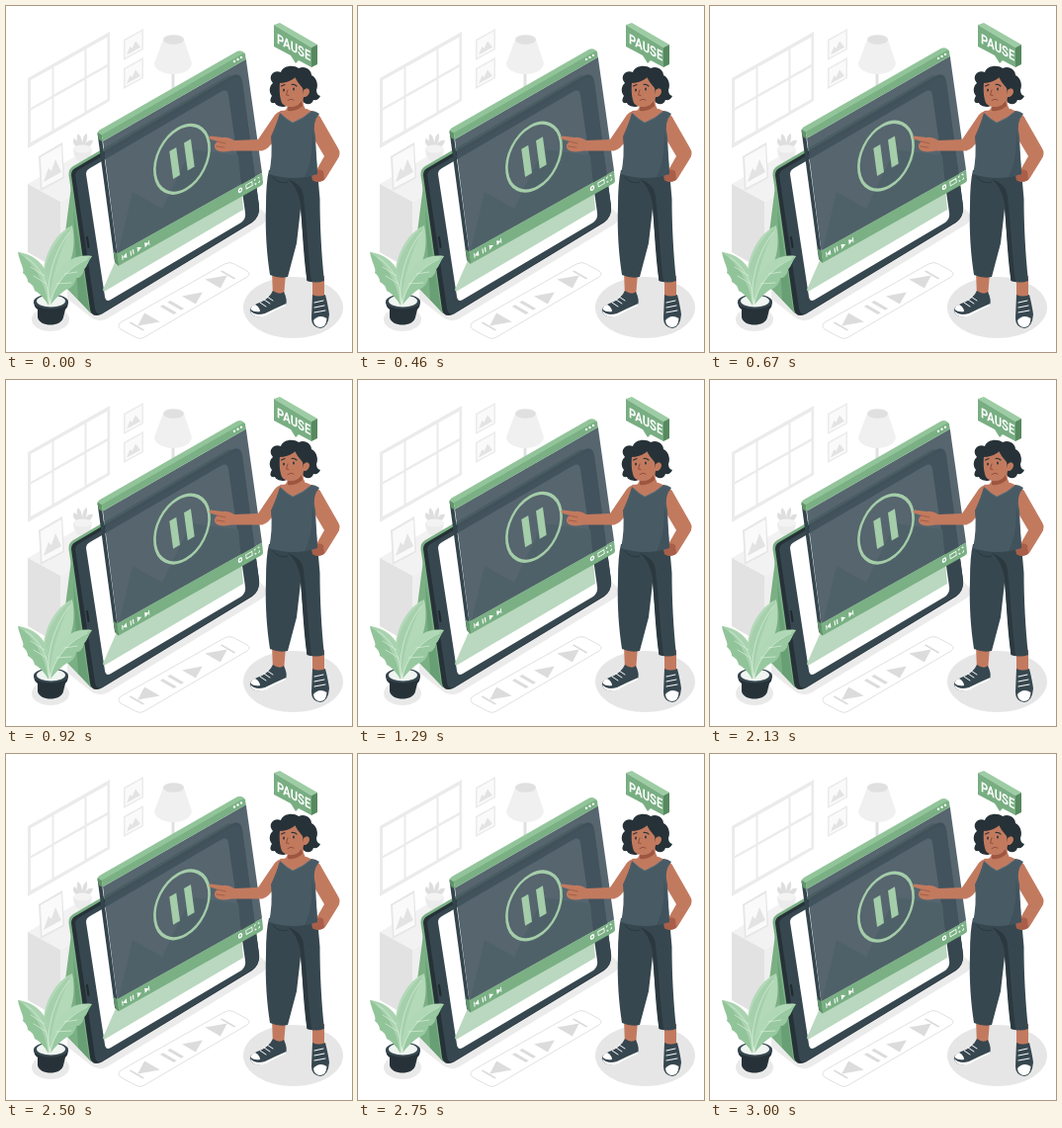
Animation, 350 px wide and 350 px high, one loop 3040 ms. Source, as an HTML page:

```html
<!DOCTYPE html>
<html lang="en">
<head>
<meta charset="utf-8">
<title>Pause</title>
<style>
  html, body { margin: 0; width: 100%; height: 100%; overflow: hidden; background: #fff; }
  svg { display: block; width: 100vw; height: 100vh; }
  .skin { fill: #c27a5f; }
  .dark { fill: #263238; }
  .slate { fill: #37474f; }
  .line { fill: none; stroke-linecap: round; stroke-linejoin: round; }
  .sign { font: 700 14px Roboto, "Liberation Sans", sans-serif; fill: #fff; }
</style>
</head>
<body>
<svg viewBox="0 0 350 350">
  <defs>
    <g id="picture">
      <path d="M0 11 20 0V21L0 32Z" fill="#ebebeb"/>
      <path d="M1.5 12 18.5 2.6V20.2L1.5 29.6Z" fill="#fafafa"/>
      <path d="M3 26.5 6.5 18 8.5 20 12 12.5 17 18.8Z" fill="#e3e3e3"/>
    </g>
    <path id="triangle" d="M-3 -3.2 3 0 -3 3.2Z"/>
  </defs>

  <!-- room -->
  <g id="room">
    <path fill="#ebebeb" fill-rule="evenodd" d="M22 73 105 26V96L22 144Z
      M25 75V103L46.500 91V63Z M48.500 61.800V89.600L79.500 72V44.500Z M81.500 43.300V70.800L102.500 59V31.500Z
      M25 105.500V138L46.500 126V93.500Z M48.500 92.300V124.800L79.500 107.400V74.800Z M81.500 73.600V106L102.500 94.200V61.700Z"/>
    <use href="#picture" x="119" y="23"/>
    <use href="#picture" x="119" y="52"/>

    <path d="M167.500 66H170.500V90H167.500Z" fill="#e0e0e0"/>
    <path d="M159 34 150 58C151 72 186 73 188 58L180 34Z" fill="#f0f0f0"/>
    <ellipse cx="169.500" cy="34" rx="10.500" ry="4.800" fill="#e0e0e0"/>

    <path d="M22 180 79 147 112 166 55 198Z" fill="#f2f2f2"/>
    <path d="M22 180 55 198V268L22 249Z" fill="#e2e2e2"/>
    <path d="M55 198 112 166V235L55 268Z" fill="#efefef"/>
    <path d="M33 152 57 138 59 174 35 187Z" fill="#e6e6e6"/>
    <path d="M35 153 56 141 57.500 173 36.500 184Z" fill="#fafafa"/>
    <path d="M38 178 43 164 46 167 50 155 56 168Z" fill="#e3e3e3"/>
    <path d="M77 146Q65 140 69 134Q74 137 76 144Q69 133 73 129Q78 134 77 143Q77 130 82 129Q83 136 78 144Q82 134 88 136Q87 143 77 146Z" fill="#dedede"/>
    <path d="M68 144C68 162 86 162 87 144Z" fill="#ebebeb"/>
    <ellipse cx="77.500" cy="144.500" rx="9.500" ry="4" fill="#f3f3f3"/>
  </g>

  <!-- floor -->
  <g id="floor">
    <path d="M62 270 250 201Q272 212 259 221L103 316Q94 321 86 315L62 296Z" fill="#ebebeb"/>
    <ellipse cx="290.500" cy="305" rx="50.500" ry="31" fill="#e6e6e6"/>
    <ellipse cx="45" cy="317" rx="19" ry="12" fill="#e9e9e9"/>
    <path d="M116 320 221 261Q226 258 231 261L244 268Q248 271 244 274L140 335Q136 338 131 335L116 327Q112 324 116 320Z" fill="#fff" stroke="#e1e1e1"/>
    <g id="floorControls" fill="#dcdcdc"></g>
  </g>

  <!-- tablet -->
  <g id="tablet">
    <path d="M66 182 86 311 59 283Q54 278 55 268Z" fill="#7ab084"/>
    <path d="M68 205 86 311 73 297Z" fill="#699f74"/>
    <path d="M63.500 171Q63 165 68 162L225 70 235 72 88 311Q85 311 84 307Z" fill="#7ab084"/>
    <path d="M66 171Q66 166 70 164L228 71Q237 66 239 76L256 203Q257 213 249 219L97 311.500Q87 316 85 307Z" fill="#263238"/>
    <path d="M70 171Q70 168 73 166L230 74Q237 70 239 78L256 202Q257 212 249 218L97 311Q91 313 90 306Z" class="slate"/>
    <path d="M81 170Q81 166 85 164L217 87Q224 83 225 90L242 209Q243 215 238 219L106 297Q101 300 100 294Z" fill="#fff"/>
    <path d="M98 287 112 255 128 188 158 205 187 145 235 151 240 206 99 289Z" fill="#b9d8bf"/>
    <path d="M82 234 83.500 244" class="line" stroke="#1f292e" stroke-width="2"/>
  </g>

  <!-- floating player -->
  <g id="player">
    <path d="M92.500 128 97 133 114 262 110 258Z" fill="#34444c"/>
    <path d="M92.500 128Q92.500 126 95 124.500L234 45Q238 43.500 241 46.500L242.500 49 97 132Z" fill="#92c49a"/>
    <path d="M92.500 127 97 130 98 137 93.500 134Z" fill="#609469"/>
    <path d="M108.500 247 112.500 250 114 262 110.500 259Z" fill="#609469"/>
    <path d="M98 136 242.800 53 259 168 112.500 250Z" fill="#44555f" opacity=".9"/>
    <path d="M97 129.500 240 47Q242 47 242 49L242.800 53 98 136Z" fill="#7ab084"/>
    <path d="M112.500 250 259 168 260 178Q260 180 258 181L114 262Z" fill="#7ab084"/>
    <g fill="#fff">
      <circle cx="231" cy="55.200" r="1.200"/><circle cx="234.500" cy="53.200" r="1.200"/><circle cx="238" cy="51.200" r="1.200"/>
    </g>
    <g transform="matrix(.866 -.5 .13 .97 178 154)" fill="#a4cda9">
      <circle r="31.500" fill="none" stroke="#a4cda9" stroke-width="3"/>
      <path d="M-12.500-14.500H-4.500V14.500H-12.500ZM4.500-14.500H12.500V14.500H4.500Z"/>
    </g>
    <g id="controls" fill="#fff"></g>
  </g>

  <!-- plant -->
  <g id="plant">
    <path d="M28 299Q28 304 32 307V315C34 325 56 325 58 315L60 307Q63 304 63 299Z" class="dark"/>
    <ellipse cx="45.500" cy="299" rx="17.500" ry="7.500" class="slate"/>
    <ellipse cx="45.500" cy="298.500" rx="14.500" ry="6" fill="#f0f5f1"/>
    <path d="M43 302C29 271 43 233 67 222C72 246 65 269 49 283Z" fill="#b3d9b8"/>
    <path d="M43 302C31 274 43 242 67 222C55 246 47 270 43 302Z" fill="#a5d0ab"/>
    <path d="M43 303C41 279 30 252 12 249C14 260 19 266 17 270Q22 274 22 279Q28 282 29 288Q36 291 43 303Z" fill="#92c49a"/>
    <path d="M43 303C48 280 42 253 12 249C28 260 39 278 43 303Z" fill="#a9d3af"/>
    <path d="M45 302C43 273 61 249 87 253C83 258 82 264 79 266Q77 275 71 275Q69 284 62 286Q55 289 45 302Z" fill="#b0d8b6"/>
    <path d="M45 302C49 281 65 262 87 253C82 259 82 264 79 266Q77 275 71 275Q69 284 62 286Q54 291 45 302Z" fill="#98c9a0"/>
    <path d="M44 302C43 279 35 264 20 254M45 301C48 282 63 265 82 256M43 299C41 274 50 247 64 229M41 281 28 273M39 273 25 264M51 281 66 280M59 271 72 269" class="line" stroke="#d9eedc" stroke-width=".7"/>
  </g>

  <!-- woman -->
  <g id="woman">
    <path d="M269 268 283 270 281 294 270 295ZM310 273 322 273 322 297 310 297Z" class="skin"/>
    <path d="M270 288Q277 293 281 289Q285 297 283 303Q271 307 263 313Q250 317 247 309Q246 304 254 301Q266 297 270 288Z" class="slate"/>
    <path d="M247 308Q252 314 262 311Q272 306 283.500 301L283 303.500Q271 308 263 313.500Q249 317 247 308Z" fill="#fff"/>
    <path d="M247.500 307Q248 303 252 302Q257 305 257 309Q251 310 247.500 307Z" fill="#fff"/>
    <path d="M257 300 263 304M261 297 267 301M264 294 270 298" class="line" stroke="#fff" stroke-width="1"/>
    <path d="M310 292Q316 295 323 292Q326 304 327 312Q326 325 318 326Q309 325 309 316Z" class="slate"/>
    <path d="M311 318Q317 311 324.500 316Q324 324.500 318 325Q311.500 324.500 311 318Z" fill="#fff"/>
    <path d="M312 310 323 308M312 305 322 303M312 300 321 298" class="line" stroke="#fff" stroke-width="1"/>

    <path d="M266 166Q263 178 263 202C262 229 264 252 267 272Q276 276 285 274L294 240 298 205 304.500 278Q314 281 322 278C319 251 317.500 220 317.500 195L315 167Z" class="slate"/>
    <path d="M298 200C300 229 301 254 304.500 278L309 279C305 245 304 218 301 193Q300 180 285 175Q295 183 298 200Z" fill="#2b393f"/>
    <path d="M270 173Q276 181 285 178" class="line" stroke="#2b393f" stroke-width="1"/>

    <path d="M303 107Q315 104 320 116L336 144Q339 149 336 154L323 175Q317 180 310 176Q308 170 314 166L322 152 309 130Z" class="skin"/>
    <path d="M310 170Q315 163 321 167L322 176Q315 180 310 176Z" fill="#a85e48"/>
    <path d="M283 106Q274 105 270 113L255 135 231 136Q224 132 219 133L207 131.500Q204.500 132 206 134.500L214 137Q209 140 212 145Q216 149 228 146.500L259 146.500Q266 145 272 134L282 121Z" class="skin"/>
    <path d="M214 137 222 139M213 142 221 143" class="line" stroke="#9d563f" stroke-width=".8"/>
    <path d="M277 106 304 104 313 108 300 122 285 121Z" class="skin"/>
    <path d="M277 108Q283 114 290 118Q302 113 309 106Q313 106 317 109Q309 118 313 132L315 170Q291 178 266 170Q270 152 268 132Q274 119 277 108Z" fill="#485b65"/>
    <path d="M309 125Q314 145 315 170L302 173Q312 153 309 125Z" fill="#40525c"/>
    <path d="M278 109Q284 115 290 118Q302 113 308 107" class="line" stroke="#62757e" stroke-width=".8"/>

    <path d="M272 98C266 99 267 94 269 91C265 86 267 80 270 78C264 71 271 64 278 67C280 60 291 59 296 63C303 60 309 65 309 70C315 73 316 81 314 85Q314 90 318 91Q316 96 311 95C309 102 301 99 300 96L281 102C278 102 273 101 272 98Z" class="dark"/>
    <path d="M285 96 301 90Q299 102 305 106Q292 117 280 107Q286 105 285 96Z" class="skin"/>
    <path d="M285 102Q294 103 299 96L300 101Q294 107 285 106Z" fill="#9d563f"/>
    <path d="M277 77Q285 79 294 71Q297 78 301 83Q306 81 307 86Q306 92 301 92Q297 102 288 102Q279 102 278 95Q276 88 277 77Z" class="skin"/>
    <path d="M276 78Q286 78 291 70Q295 78 300 83L301 89Q307 89 308 80L299 66 277 69Z" class="dark"/>
    <path d="M301 85Q306 81 307 86Q306 92 301 92Z" class="skin"/>
    <ellipse cx="281" cy="85" rx=".9" ry="1.500" class="dark"/>
    <ellipse cx="291" cy="84" rx=".9" ry="1.500" class="dark"/>
    <path d="M278.500 81 282 79.500M289 79.500Q292 79 294 81" class="line" stroke="#263238" stroke-width="1.100"/>
    <path d="M285 85 283.500 90 286 90.500M285 95.500Q288 93 291 95" class="line" stroke="#8d4936" stroke-width=".9"/>
  </g>

  <!-- sign -->
  <g id="sign">
    <path d="M271 19 277 17 315 39 309 42Z" fill="#9dcca4"/>
    <path d="M309 42 315 39V59L309 62Z" fill="#57895f"/>
    <path d="M271 19 309 42V62L296 55 293 58 288 50 271 41Z" fill="#78ae82"/>
    <text class="sign" transform="matrix(.8 .43 0 1 274 37.500)">PAUSE</text>
  </g>
</svg>
<script>
  const LOOP = 3040;
  const REST = 0.8;
  const LIFT = 7;
  const byId = id => document.getElementById(id);
  const player = byId("player");

  const place = (plane, x, y, shape) => `<g transform="matrix(${plane} ${x} ${y})">${shape}</g>`;
  const onScreen = (x, y, shape) => place(".866 -.5 .13 .97", x, y, shape);
  const onFloor = (x, y, d) => place(".866 -.5 .866 .5", x, y, `<path d="${d}"/>`);
  const outline = d => `<path d="${d}" fill="none" stroke="#fff" stroke-width=".9"/>`;
  const arrow = turn => `<use href="#triangle" transform="scale(${turn * .8} .8)"/>`;

  byId("controls").innerHTML = [
    onScreen(120, 252.5, arrow(-1) + '<path d="M-3-2.500h1v5h-1z"/>'),
    onScreen(127.5, 248.5, '<path d="M-2-2.500h1.200v5H-2zM.8-2.500H2v5H.8z"/>'),
    onScreen(135, 244.5, arrow(1)),
    onScreen(142.5, 240, arrow(1) + '<path d="M2-2.500h1v5H2z"/>'),
    onScreen(237, 185.5, '<circle r="1.800" fill="none" stroke="#fff" stroke-width="1.500"/>'),
    onScreen(246, 180.5, outline("M-3.500-2H3.500V2H-3.500Z")),
    onScreen(254, 176, outline("M-2.500-1V-2.500H-1M1-2.500H2.500V-1M2.500 1V2.500H1M-1 2.500H-2.500V1")),
  ].join("");

  byId("floorControls").innerHTML = [
    onFloor(141, 319, "M-9 0 8-9V9ZM-11-8H-9V8H-11Z"),
    onFloor(168, 305, "M-6-8H-2.500V8H-6ZM2.500-8H6V8H2.500Z"),
    onFloor(191, 294, "M-7-8V8L9 0Z"),
    onFloor(216, 277, "M9 0-8-9V9ZM9-8H11V8H9Z"),
  ].join("");

  // Constant speed up for half the loop, then back down.
  function render(now) {
    const phase = (now % LOOP) / LOOP;
    const height = 1 - Math.abs(2 * phase - 1);
    player.setAttribute("transform", `translate(0 ${(REST - LIFT * height).toFixed(3)})`);
  }

  const start = performance.now();
  function tick() {
    render(performance.now() - start);
    requestAnimationFrame(tick);
  }
  tick();
</script>
</body>
</html>
```
